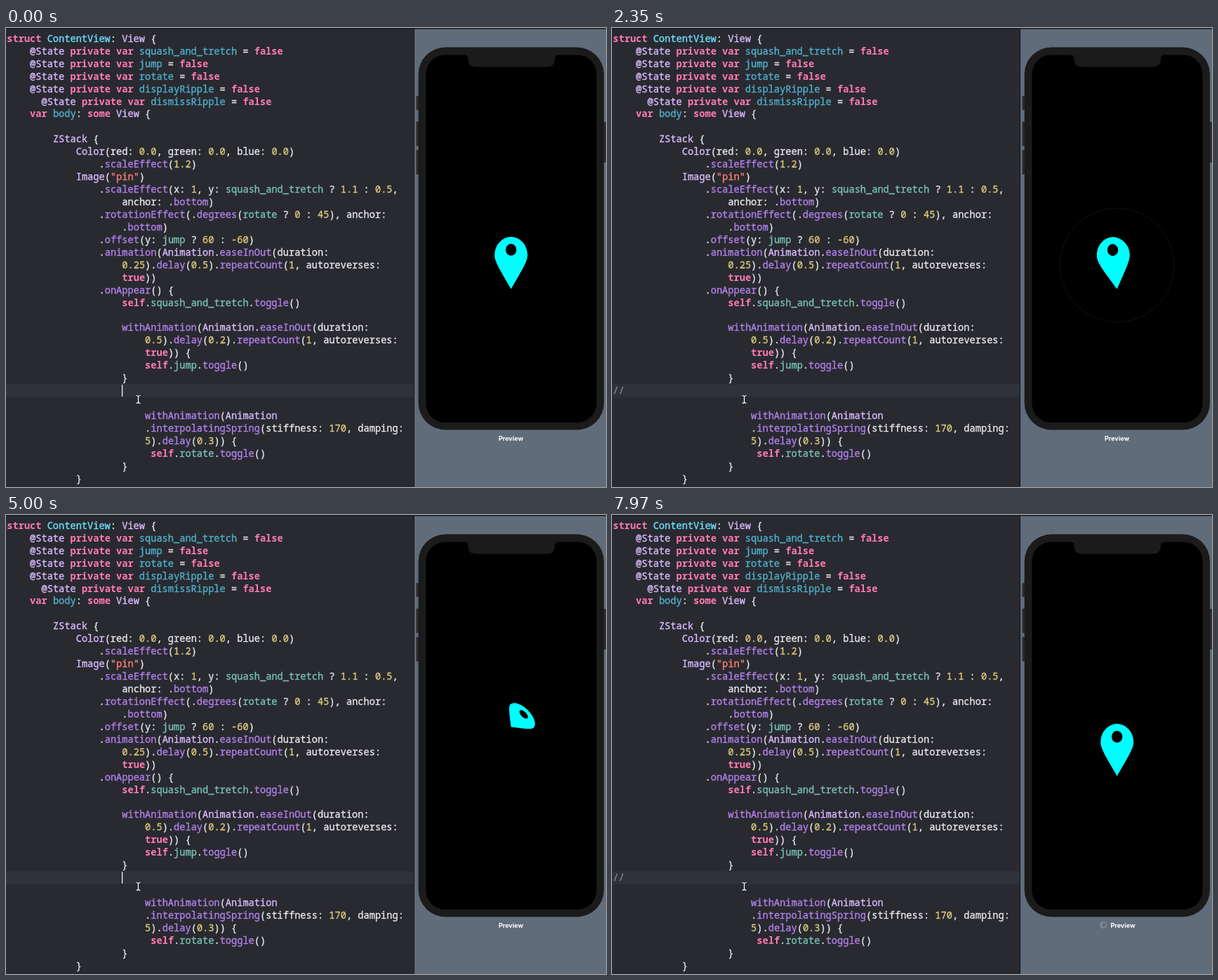
An HTML page for the animation above (8 s loop, 855 by 655 pixels).

```html
<!DOCTYPE html>
<html lang="en">
<head>
<meta charset="utf-8">
<title>Pin animation preview</title>
<style>
  html, body { margin: 0; width: 100%; height: 100%; overflow: hidden; background: #292a30; }
  svg { display: block; width: 855px; height: 655px; }
  #code text, #comment {
    font: 500 13.67px "Noto Sans Mono", "DejaVu Sans Mono", monospace;
    white-space: pre; color: #e8e8ea;
  }
  #code tspan, #comment { fill: currentColor; stroke: currentColor; stroke-width: 0.35px; }
  #code .keyword { color: #ff7ab2; font-weight: 700; stroke: none; }
  #code .type { color: #dabaff; }
  #code .struct { color: #6bdfff; }
  #code .decl { color: #4eb0cc; }
  #code .call { color: #b281eb; }
  #code .prop { color: #78c2b3; }
  #code .number { color: #d9c97c; }
  #code .string { color: #ff8170; }
  #comment { color: #7f8c98; }
  #label, #clock { font: 600 9px Inter, "Open Sans", sans-serif; }
  #label { font-weight: 700; }
</style>
</head>
<body>
<svg viewBox="0 0 855 655">
  <rect width="855" height="655" fill="#292a30"/>
  <rect y="508.5" width="581" height="18" fill="#2f3239"/>
  <g id="code"></g>
  <text id="comment" x="1.3" y="522">//</text>
  <rect id="caret" y="509" width="1.2" height="17" fill="#fff"/>
  <path d="M185.5 524.5q3 0 3 2v7q0 2-3 2M191.5 524.5q-3 0-3 2v7q0 2 3 2" fill="none" stroke="#fff" stroke-width="1.2"/>

  <rect x="582" width="273" height="655" fill="#616c7a"/>
  <rect x="581" width="1" height="655" fill="#111216"/>
  <rect width="855" height="1.5" fill="#191a1e"/>

  <g fill="#2b2d31">
    <rect x="584.5" y="97" width="5" height="20" rx="1"/>
    <rect x="584.5" y="133.5" width="5" height="35" rx="1"/>
    <rect x="584.5" y="174" width="5" height="35" rx="1"/>
    <rect x="850" y="134" width="5" height="58" rx="1"/>
  </g>
  <rect x="587.7" y="27.5" width="264.300" height="546" rx="38.5" fill="#1b1b1b"/>
  <rect id="screen" x="598.5" y="38.5" width="243" height="524.5" rx="27"/>
  <g id="scene">
    <circle id="ripple" cx="719.7" cy="338.3" fill="none" stroke="#fff"/>
    <g id="pin">
      <path d="M0 0C-16-25-23.5-36-23.5-44A23.5 23.7 0 0 1 23.5-44C23.5-36 16-25 0 0Z" fill="#0ff"/>
      <circle cy="-51" r="7.7"/>
    </g>
  </g>
  <g id="status">
    <text id="clock" x="632" y="54.7" text-anchor="middle">09:41</text>
    <path d="M800 50.2q4.5-3.8 9 0M801.8 52.2q2.7-2.2 5.4 0" fill="none" stroke="#000" stroke-width="1.4"/>
    <circle cx="804.5" cy="53.7" r="1"/>
    <rect x="814" y="48.7" width="12" height="6" rx="1.7"/>
    <rect x="826.6" y="50.7" width="1" height="2" rx=".5"/>
  </g>
  <path d="M653 38H787Q782 39 782 44Q782 55.5 770 55.5H670Q658.5 55.5 658.5 44Q658.5 39 653 38Z" fill="#1b1b1b"/>
  <g id="spinner" transform="translate(700.5 585)"></g>
  <text id="label" y="588.5" text-anchor="middle" fill="#fff">Preview</text>
</svg>
<script>
const SOURCE = `struct ContentView: View {
    @State private var squash_and_tretch = false
    @State private var jump = false
    @State private var rotate = false
    @State private var displayRipple = false
      @State private var dismissRipple = false
    var body: some View {

        ZStack {
            Color(red: 0.0, green: 0.0, blue: 0.0)
                .scaleEffect(1.2)
            Image("pin")
                .scaleEffect(x: 1, y: squash_and_tretch ? 1.1 : 0.5,
                    anchor: .bottom)
                .rotationEffect(.degrees(rotate ? 0 : 45), anchor:
                    .bottom)
                .offset(y: jump ? 60 : -60)
                .animation(Animation.easeInOut(duration:
                    0.25).delay(0.5).repeatCount(1, autoreverses:
                    true))
                .onAppear() {
                    self.squash_and_tretch.toggle()

                    withAnimation(Animation.easeInOut(duration:
                        0.5).delay(0.2).repeatCount(1, autoreverses:
                        true)) {
                        self.jump.toggle()
                    }


                        withAnimation(Animation
                        .interpolatingSpring(stiffness: 170, damping:
                        5).delay(0.3)) {
                         self.rotate.toggle()
                    }
            }`;

const RULES = {
  keyword: /^(struct|private|var|some|self|true|false)$/,
  type: /^(@State|View|ZStack|Color|Image|Animation)$/,
  struct: /^ContentView$/,
  call: /^(scaleEffect|bottom|rotationEffect|degrees|offset|animation|easeInOut|delay|repeatCount|onAppear|toggle|withAnimation|interpolatingSpring)$/,
  prop: /^(squash_and_tretch|jump|rotate)$/,
  number: /^-?\d/,
  string: /^"/
};
const NS = "http://www.w3.org/2000/svg";
const $ = id => document.getElementById(id);

function add(parent, tag, attrs, text = "") {
  const el = document.createElementNS(NS, tag);
  for (const name in attrs) el.setAttribute(name, attrs[name]);
  el.textContent = text;
  return parent.appendChild(el);
}

function drawCode() {
  const advance = 8.2, lineHeight = 17.94;
  SOURCE.split("\n").forEach((line, row) => {
    const indent = line.search(/\S/);
    if (indent < 0) return;
    const text = add($("code"), "text", { x: 1.3 + indent * advance, y: 19.8 + row * lineHeight });
    let previous = "";
    for (const token of line.trim().match(/"[^"]*"|-?\d+(\.\d+)?|@?\w+|\s+|[^\w\s]/g)) {
      const kind = previous === "var" ? "decl"
        : Object.keys(RULES).find(name => RULES[name].test(token)) || "plain";
      add(text, "tspan", { class: kind }, token);
      if (token.trim()) previous = token;
    }
  });
}

function drawSpinner() {
  for (let i = 0; i < 12; i++) {
    add($("spinner"), "path", {
      d: "M0-2.7V-5.3", stroke: "#d5dae0", "stroke-width": 0.9,
      opacity: 0.25 + 0.05 * i, transform: `rotate(${i * 30})`
    });
  }
}

const LOOP = 8000;
const STEP = 80;
const STEPS_PER_SECOND = 12;
const CARET_ON = [[0, 1060], [1630, 2190], [2750, 3310], [3870, 4430], [4840, 5410], [6050, 6530], [7010, 7570]];
const COMMENT_ON = [[410, 3950], [7010, LOOP]];
const WHITE = [[1310, 1390], [4920, 5000]];
const LOADING = [[1390, 1470], [4840, 4920], [7970, LOOP]];
const EDITED = [[490, 1390], [3950, 5000], [7010, 7970]];

const within = (t, spans) => spans.some(([from, to]) => t >= from && t < to);
const show = (id, visible) => $(id).setAttribute("visibility", visible ? "visible" : "hidden");
const progress = (s, delay, duration) => Math.min(1, Math.max(0, (s - delay) / duration));
const easeInOut = p => (1 - Math.cos(Math.PI * p)) / 2;

// Damped spring: stiffness 170, damping 5, unit mass.
function spring(s) {
  if (s <= 0) return 1;
  const decay = 2.5, omega = Math.sqrt(170 - decay * decay);
  return Math.exp(-decay * s) * (Math.cos(omega * s) + decay / omega * Math.sin(omega * s));
}

// Seconds since the preview last appeared.
function sceneTime(t) {
  if (t < 1390) return 10;
  const [start, lead] = t < 5000 ? [1390, 0] : [5010, 0.02];
  return Math.max(0, Math.floor((t - start) / STEP)) / STEPS_PER_SECOND + lead;
}

function drawScene(s) {
  const y = 302.5 + 70 * easeInOut(progress(s, 0.2, 0.5));
  const angle = 45 * spring(s - 0.3);
  const squash = 0.5 + 0.6 * easeInOut(progress(s, 0.5, 0.25));
  $("pin").setAttribute("transform", `translate(719.7 ${y}) rotate(${angle}) scale(1 ${squash})`);

  const spread = easeInOut(progress(s, 0.5, 0.6));
  $("ripple").setAttribute("r", 87 * spread);
  $("ripple").setAttribute("opacity", spread > 0 ? 1 - spread : 0);
}

function render(t) {
  const white = within(t, WHITE), commented = within(t, COMMENT_ON), loading = within(t, LOADING);
  show("comment", commented);
  show("caret", within(t, CARET_ON));
  $("caret").setAttribute("x", commented ? 181.3 : 165);
  show("status", white);
  show("scene", !white);
  $("screen").setAttribute("fill", white ? "#fff" : "#000");
  show("spinner", loading);
  $("label").setAttribute("x", loading ? 728 : within(t, EDITED) ? 721.5 : 719.5);
  drawScene(sceneTime(t));
}

drawCode();
drawSpinner();
const began = performance.now();
function tick() {
  render((performance.now() - began) % LOOP);
  requestAnimationFrame(tick);
}
tick();
</script>
</body>
</html>
```
